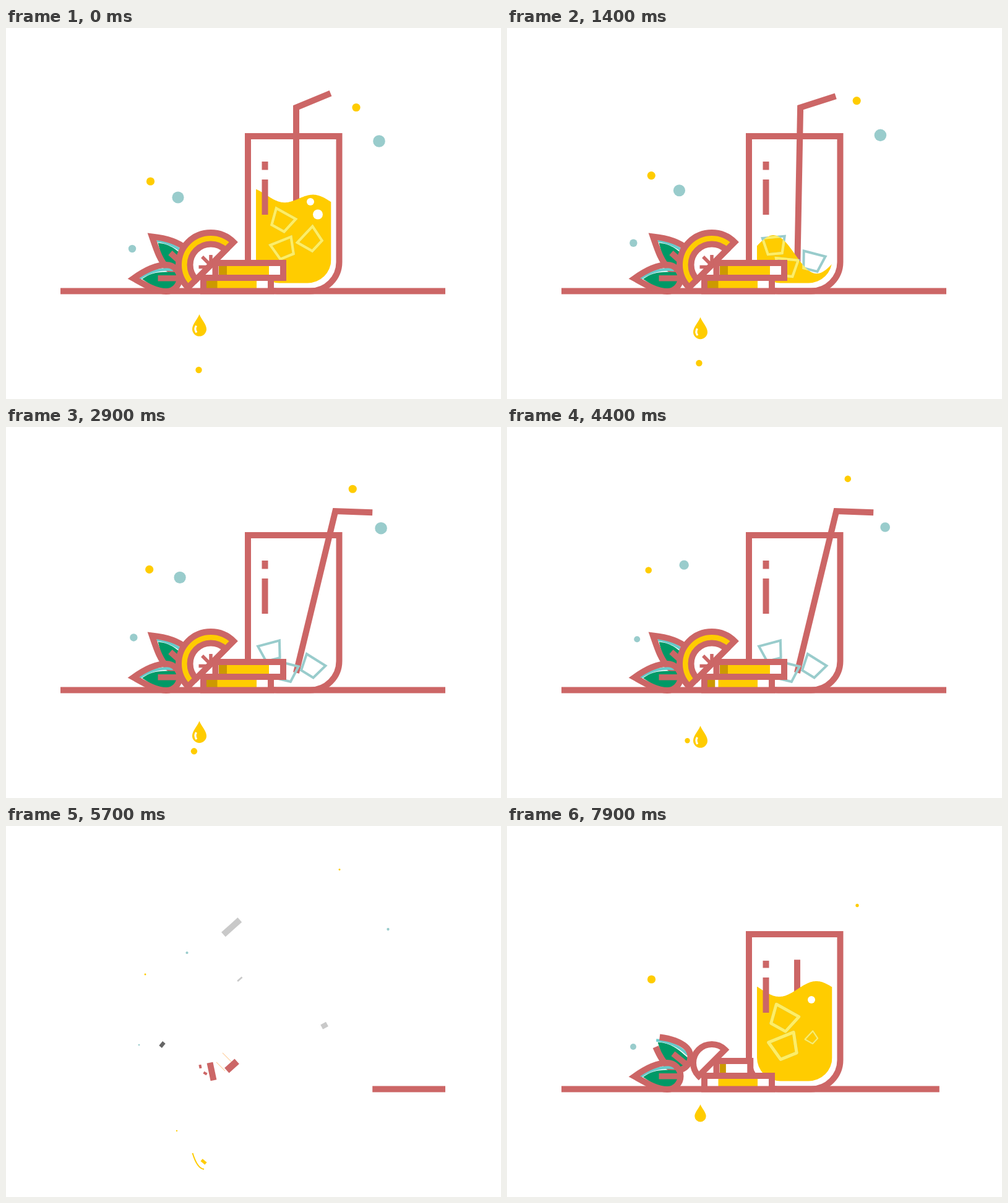
An HTML page with a canvas for the animation above (8000 ms loop, 800 by 600 pixels).

```html
<!DOCTYPE html>
<html lang="en">
<head>
<meta charset="utf-8">
<title>Juice</title>
<style>
html, body { margin: 0; width: 100%; height: 100%; overflow: hidden; background: #fff; }
canvas { display: block; }
</style>
</head>
<body>
<canvas id="stage" width="800" height="600"></canvas>
<script>
const ctx = document.getElementById('stage').getContext('2d');
const LOOP = 8000, BLANK = 6600;
const RED = '#cc6666', YELLOW = '#ffcc00', GREEN = '#009966', TEAL = '#66cccc',
      BLUE = '#99cccc', OCHRE = '#cc9900', GRAY = '#c9c9c9', PALE = '#ffee66';
const RAD = Math.PI / 180;

const clamp = v => Math.max(0, Math.min(1, v));
const mix = (a, b, u) => a + (b - a) * u;
const part = (t, a, b) => clamp((t - a) / (b - a));
const ease = (t, a, b) => {
  const u = part(t, a, b);
  return u < .5 ? 2 * u * u : 1 - 2 * (1 - u) ** 2;
};
// 0 to 1 with an overshoot of a quarter.
const pop = u => 1 + 4 * (u - 1) ** 3 + 3 * (u - 1) ** 2;
// 1 while a piece is on stage; leaves during a..b, returns during c..d.
const shown = (t, a, b, c, d) => t < BLANK ? 1 - ease(t, a, b) : ease(t, c, d);

function group(draw) { ctx.save(); draw(); ctx.restore(); }
function turn(x, y, deg) {
  ctx.translate(x, y);
  ctx.rotate(deg * RAD);
  ctx.translate(-x, -y);
}
function box(x, y, w, h, color) {
  ctx.fillStyle = color;
  ctx.fillRect(x, y, w, h);
}
function disc(x, y, r, color) {
  if (r <= 0) return;
  ctx.fillStyle = color;
  ctx.beginPath();
  ctx.arc(x, y, r, 0, 7);
  ctx.fill();
}
function fill(path, color) {
  ctx.fillStyle = color;
  ctx.fill(path);
}
function line(path, color, width) {
  ctx.strokeStyle = color;
  ctx.lineWidth = width;
  ctx.stroke(path);
}
// Strokes the share p of a path, centred on the position mid (0..1).
function trim(path, length, p, mid, color) {
  if (p <= 0) return;
  if (p < 1) {
    ctx.setLineDash([length * p, length * (1 - p)]);
    ctx.lineDashOffset = length * (p / 2 - mid);
  }
  line(path, color, 10);
  ctx.setLineDash([]);
}

const glassPath = new Path2D('M465 175H391V378.5A47 47 0 0 0 438 425.5H491.5A47 47 0 0 0 538.5 378.5V175Z');
const leafPath = new Path2D('M8 0C26-13 44-22 61-22A21.5 21.5 0 0 1 61 21C44 21 26 10 8 0Z');
const leafFill = new Path2D('M22 1C36-9 48-12 76-10A19 19 0 0 1 61 18C46 18 34 9 22 1Z');
const leafShine = new Path2D('M18 0Q42-17 72-14');
const icePath = new Path2D('M-18-13.5H18L11.5 13.5H-11.5Z');
const dropPath = new Path2D('M0 0C3 8 11.5 16 11.5 24A11.5 11.5 0 0 1-11.5 24C-11.5 16-3 8 0 0Z');

// Start, drift to the end, radius and colour, in order of appearance.
const dots = [
  [233.5, 248, -8.5, -8, 6.6, YELLOW],
  [204, 357, 11, -3, 6.2, BLUE],
  [566, 128.5, -27, -58, 6.6, YELLOW],
  [603, 183, 14.5, -16, 9.8, BLUE],
  [278, 274, 14.5, -69, 9.6, BLUE],
  [311.5, 553, -35.5, -60, 5.2, YELLOW]
];
function drawDots(t) {
  const leaving = t < BLANK;
  const u = leaving ? part(t, 500, 5700) : 0;
  const fade = 1 - .2 * part(t, 2900, 4400) - .58 * part(t, 4400, 5700) - .22 * part(t, 5700, 6100);
  dots.forEach(([x, y, dx, dy, r, color], i) => {
    const size = leaving ? fade : part(t, 7660 + 80 * i, 7860 + 80 * i);
    disc(x + dx * u * u, y - 64 * u * (1 - u) + dy * u * u, r * size, color);
  });
}

function drawDrop(t) {
  const leaving = t < BLANK;
  const k = leaving ? 1 - ease(t, 4900, 5600) : clamp((t - 6833) / 1333);
  if (!k) return;
  const tip = leaving
    ? 463 + .0052 * Math.max(0, t - 500) + 30 * ease(t, 4900, 5700)
    : 444 + (t - 7100) / 130;
  group(() => {
    ctx.translate(312.5, tip);
    ctx.scale(k, k);
    fill(dropPath, YELLOW);
    if (leaving) line(new Path2D('M-5 18.5Q-8.5 24-4.5 29.5'), '#fff', 3.2);
  });
}

const isWet = t => t < 2300 || t > 6700;
// Height of the juice at x, while it drains and while it rises.
function surface(t) {
  const wave = (base, amp, dip, len, tilt) =>
    x => base + tilt * (x - 465) + amp * Math.cos(2 * Math.PI * (x - dip) / len);
  if (t < BLANK) {
    const s = Math.max(0, t - 500) / 900;
    return wave(275 + 91 * s, 9 + 17 * Math.min(1, s), 447 + 51 * s, 105 + 25 * s, .11 + .04 * s);
  }
  const u = part(t, 6700, 7900);
  return wave(mix(263.5, 425, (1 - u) ** 1.8), 12.5, mix(490, 440, u), mix(126, 120, u), -.15 * (1 - u));
}
function juicePath(t) {
  const top = surface(t), path = new Path2D();
  path.moveTo(404, 420);
  for (let x = 404; x <= 525.5; x += 1.5) path.lineTo(x, Math.min(420, top(x)));
  path.lineTo(525.5, 420);
  path.closePath();
  return path;
}

// Each cube floats at the first pose (x, y, angle) and sinks to the second.
const cubes = [
  [[446, 312, 29], [428, 363, -15]],
  [[449, 357, -22], [452, 396, 14]],
  [[493, 343, -47], [494, 388, 32]]
];
function drawIce(t, color) {
  const leaving = t < BLANK;
  const sink = leaving ? 1 - (1 - part(t, 500, 2200)) ** 2 : 0;
  cubes.forEach(([from, to], i) => {
    const k = leaving ? 1 - ease(t, 4500, 5500) : pop(part(t, 7760 + 60 * i, 7960 + 60 * i));
    if (k <= 0) return;
    const [x, y, deg] = from.map((v, n) => mix(v, to[n], sink));
    group(() => {
      ctx.translate(x, y);
      ctx.rotate(deg * RAD);
      ctx.scale(k, k);
      ctx.lineJoin = leaving ? 'miter' : 'round';
      line(icePath, color, 4);
    });
  });
}

function drawStraw(t, color) {
  const now = t < BLANK ? t : 0;
  const lean = 13.6 * ease(now, 1200, 2200) * RAD;
  const bend = mix(-22.3, 2, ease(now, 1050, 2200)) * RAD;
  const x = 469 + 269 * Math.sin(lean), y = 397.5 - 269 * Math.cos(lean);
  const path = new Path2D();
  path.moveTo(469, 397.5);
  path.lineTo(x, y);
  path.lineTo(x + 60 * Math.cos(bend), y + 60 * Math.sin(bend));
  const p = shown(t, 4500, 5850, 7700, 8080);
  trim(path, 329, p, p / 2, color);
}

function drawJuice(t) {
  group(() => {
    ctx.beginPath();
    ctx.roundRect(404, 100, 121.5, 312.5, [0, 0, 38, 38]);
    ctx.clip();
    fill(juicePath(t), YELLOW);
    if (t < 1400 || t >= 7800) disc(492, 281, 6, '#fff');
    if (t < 1400) disc(504, 301.5, 8, '#fff');
  });
}

function drawGlass(t) {
  const leaving = t < BLANK;
  const color = leaving && t >= 5500 ? GRAY : RED;
  const tilt = leaving ? -42 * part(t, 4500, 5700) ** 2 : 20 * (1 - part(t, 6700, 7500)) ** 2;
  group(() => {
    turn(400, 300, tilt);
    drawStraw(t, color);
    if (isWet(t)) drawJuice(t);
    drawIce(t, BLUE);
    if (isWet(t)) group(() => {
      ctx.clip(juicePath(t));
      drawIce(t, PALE);
    });
    trim(glassPath, 755.6, shown(t, 4600, 5900, 6600, 7420), leaving ? 0 : .5, color);
    const bar = 57 * shown(t, 4600, 5900, 6800, 7500);
    box(413.5, leaving ? 245 : 302 - bar, 10, bar, color);
    const dot = 13.5 * shown(t, 4500, 5500, 7500, 8040);
    box(413.5, 229.5 - dot, 10, dot, color);
  });
}

function drawLeaf(x, y, deg, p) {
  if (p <= .04) return;
  group(() => {
    ctx.translate(x, y);
    ctx.rotate(deg * RAD);
    turn(82, 0, -20 * (1 - p));
    const k = clamp(p * 2);
    ctx.translate(82 * (1 - k), 0);
    ctx.scale(k, k);
    fill(leafFill, GREEN);
    line(leafShine, TEAL, 4.5);
    ctx.miterLimit = 4;
    trim(leafPath, 178, p, .5, RED);
    box(83 - 35.5 * p, -5, 35.5 * p, 9.5, RED);
  });
}

// Half a slice cut along the diagonal; sweep opens its arc.
function halfSlice(r, sweep, color) {
  const path = new Path2D(), half = Math.PI / 2 * sweep;
  path.arc(331, 383, r, 1.25 * Math.PI - half, 1.25 * Math.PI + half);
  path.closePath();
  fill(path, color);
  line(path, RED, 10);
}
function drawCitrus(t) {
  const leaving = t < BLANK;
  const rind = leaving ? 1 - ease(t, 4500, 5000) : 0;
  const core = leaving ? 33.5 * (1 - part(t, 4900, 5600)) : 20.5 + 13 * part(t, 6800, 8300);
  const sweep = leaving ? 1 : ease(t, 6650, 7400);
  if (rind) halfSlice(33.5 + 18.5 * rind, 1, YELLOW);
  if (core && sweep) halfSlice(core, sweep, '#fff');
  if (rind > .5) line(new Path2D('M331 367V384M311.5 386.5H328.5M317 370L333 386'), RED, 5.5);
}

// A slab of fruit; the fills are [x, width, colour].
function drawSlab(x, y, w, h, fills) {
  if (w <= 0 || h <= 0) return;
  box(x, y, w, h, '#fff');
  group(() => {
    ctx.beginPath();
    ctx.rect(x, y, w, h);
    ctx.clip();
    for (const [left, width, color] of fills) box(left, y, width, h, color);
  });
  ctx.strokeStyle = RED;
  ctx.lineWidth = 10;
  ctx.strokeRect(x, y, w, h);
}
function drawSlabs(t) {
  const low = 21.5 * shown(t, 4600, 5600, 6850, 7400);
  drawSlab(319, 425.5 - low, 109, low, [
    [324, 18 * shown(t, 4200, 4700, 8000, 8100), OCHRE],
    [341.5, 63.5 * shown(t, 4500, 5200, 7450, 7800), YELLOW]
  ]);
  drawSlab(338.5, 380, 109.5 * shown(t, 4500, 5500, 7700, 8100), 24, [
    [344, 13 * shown(t, 4500, 4900, 7750, 7980), OCHRE],
    [357, 68 * shown(t, 4500, 5200, 8000, 8100), YELLOW]
  ]);
}

// Last scraps of the fruit and the drop, shrinking away.
function drawScraps(t) {
  if (t < 5600 || t >= 5900) return;
  const k = part(5900 - t, 0, 200);
  const scrap = (x, y, w, h, deg, color) => group(() => {
    turn(x, y, deg);
    box(x - w * k / 2, y - h * k / 2, w * k, h * k, color);
  });
  scrap(332.5, 397, 10, 29, -12, RED);
  scrap(365, 388, 22, 11, -42, RED);
  scrap(252.5, 353.5, 6, 9, 40, '#666');
  for (let i = 0; i < 2; i++) {
    scrap(314 + 8 * i, 389 + 11 * i, 4, 6, -12 - 48 * i, RED);
    scrap(347 + 10 * i, 389 - 15 * i, 20, 1, 45, '#ffcc99');
  }
  scrap(319.5, 543, 9, 5, 40, YELLOW);
  line(new Path2D('M301.5 529Q309 554 320 555'), YELLOW, 2 * k);
}

function drawTable(t) {
  const leaving = t < BLANK;
  const from = leaving ? mix(88, 710, ease(t, 4800, 6100)) : 88;
  const grown = .346 * part(t, 6600, 7100) + .524 * part(t, 7100, 7500) + .112 * part(t, 7500, 7900);
  const to = leaving ? 710 : mix(88, 710, grown);
  box(from, 420.5, to - from, 10, RED);
}

function draw(t) {
  box(0, 0, 800, 600, '#fff');
  drawTable(t);
  drawGlass(t);
  drawLeaf(230, 332, 42, shown(t, 4500, 5500, 7500, 8050));
  drawLeaf(198, 405, 0, shown(t, 4600, 5600, 6750, 7400));
  drawCitrus(t);
  drawSlabs(t);
  drawScraps(t);
  drawDots(t);
  drawDrop(t);
}

const start = performance.now();
function tick() {
  const t = (performance.now() - start) % LOOP;
  draw(t < 500 ? 0 : Math.floor(t / 100) * 100);
  requestAnimationFrame(tick);
}
tick();
</script>
</body>
</html>
```
